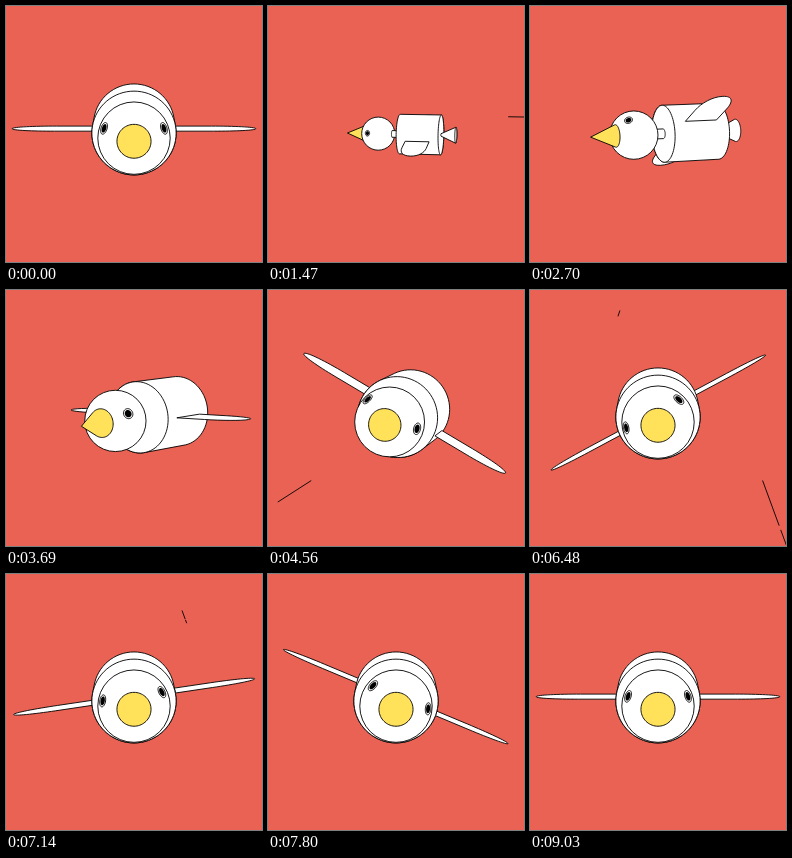
An HTML page with a canvas that plays this animation: 256x256 px, repeating every 9.06 s.

```html
<!DOCTYPE html>
<html lang="en">
<head>
<meta charset="utf-8">
<title>Flying bird</title>
<style>
  html, body { margin: 0; width: 100%; height: 100%; overflow: hidden; background: #e96254; }
  canvas { display: block; width: 256px; height: 256px; }
</style>
</head>
<body>
<canvas id="stage"></canvas>
<script>
const SIZE = 256, LOOP = 9060, STEP = 30;
const RED = '#e96254', YELLOW = '#ffe25a', INK = '#000';
const canvas = document.getElementById('stage');
const ctx = canvas.getContext('2d');
const dpr = window.devicePixelRatio || 1;
canvas.width = canvas.height = SIZE * dpr;

const RAD = Math.PI / 180;
const UNIT = 42.3;        // body radius in pixels at zoom 1
const DIST = 50;          // camera distance in body radii
const PIVOT = 1.25;       // point on the bird's axis the camera circles
const PITCH = 6 * RAD;
const HEAD = { z: 2.17, r: 0.84 };
const WIND = 90;          // body radii per second
const END = LOOP - STEP;

const yawKeys = [[0, 0], [1250, 102.5], [1470, 101], [2700, 66], [4560, 9.6], [5200, 0], [END, 0]];
const zoomKeys = [[0, 1], [1000, 0.55], [1470, 0.467], [2700, 0.675], [4560, 0.965], [5200, 1], [END, 1]];
const rollKeys = [[0, 0], [1470, -14.5], [2750, 30], [4650, -30.2], [6500, 28.3], [8100, -28], [END, 0]];

// time, x, y, z of the leading end at that time, length
const streaks = [
  [700, -1, 0.3, 0, 5],
  [1470, 0, 0.97, -4.4, 4],
  [2200, -1, -0.6, 0, 5],
  [3150, -1, 0.8, 0, 5],
  [4560, -1.83, -1.4, 6.25, 3.6],
  [5150, 1.9, -1.5, 1, 6],
  [6480, 2.48, -1.49, 8.15, 6.9],
  [6480, 2.48, -1.49, 11, 2.3],
  [6480, -1.32, 1.27, -18.75, 3.6],
  [8150, -1.6, 1, 1, 5]
];

// Monotone cubic through the keys, flat at every extreme
function sample(keys, t) {
  let i = 0;
  while (i < keys.length - 2 && t > keys[i + 1][0]) i++;
  const slope = k => (keys[k + 1][1] - keys[k][1]) / (keys[k + 1][0] - keys[k][0]);
  const tangent = k => {
    if (k === 0 || k === keys.length - 1) return 0;
    const a = slope(k - 1), b = slope(k);
    return a * b <= 0 ? 0 : 2 * a * b / (a + b);
  };
  const [t0, v0] = keys[i], [t1, v1] = keys[i + 1];
  const h = t1 - t0, u = (t - t0) / h, w = 1 - u;
  return w * w * (1 + 2 * u) * v0 + u * u * (3 - 2 * u) * v1
    + h * u * w * (w * tangent(i) - u * tangent(i + 1));
}

let yaw = 0, roll = 0, zoom = 1;

// Yaw and pitch only
function turn([x, y, z]) {
  const X = x * Math.cos(yaw) - z * Math.sin(yaw);
  const Z = x * Math.sin(yaw) + z * Math.cos(yaw);
  return [X, y * Math.cos(PITCH) - Z * Math.sin(PITCH), Z * Math.cos(PITCH) + y * Math.sin(PITCH)];
}

function bank([x, y, z]) {
  const c = Math.cos(roll), s = Math.sin(roll);
  return [x * c - y * s, x * s + y * c, z];
}

function project([x, y, z]) {
  const [X, Y, Z] = turn([x, y, z - PIVOT]);
  const k = UNIT * zoom * DIST / (DIST - Z);
  return { x: SIZE / 2 + X * k, y: SIZE / 2 - Y * k, k, depth: Z };
}

const place = p => project(bank(p));

function paint(fill) {
  ctx.fillStyle = fill;
  ctx.fill();
  ctx.stroke();
}

function trace(points) {
  ctx.beginPath();
  points.forEach(p => ctx.lineTo(p.x, p.y));
  ctx.closePath();
}

function hull(points) {
  const pts = points.slice().sort((a, b) => a.x - b.x || a.y - b.y);
  const half = list => {
    const out = [];
    for (const p of list) {
      while (out.length > 1) {
        const a = out[out.length - 2], b = out[out.length - 1];
        if ((b.x - a.x) * (p.y - a.y) - (b.y - a.y) * (p.x - a.x) > 0) break;
        out.pop();
      }
      out.push(p);
    }
    out.pop();
    return out;
  };
  return half(pts).concat(half(pts.reverse()));
}

function ring(z, r) {
  return Array.from({ length: 72 }, (_, i) => {
    const a = i * 5 * RAD;
    return project([r * Math.cos(a), r * Math.sin(a), z]);
  });
}

// Cylinder or cone along the bird's axis, with the end cap that faces us
function solid(back, rBack, front, rFront, fill, facing) {
  const a = ring(back, rBack), b = ring(front, rFront);
  trace(hull(a.concat(b)));
  paint(fill);
  if (facing ? rFront : rBack) {
    trace(facing ? b : a);
    paint(fill);
  }
}

// Flat wing with straight edges and a domed tip
function wing(side) {
  const p = (u, z) => place([side * u, 0, z]);
  const line = a => ctx.lineTo(a.x, a.y);
  const curve = (a, b, c) => ctx.bezierCurveTo(a.x, a.y, b.x, b.y, c.x, c.y);
  ctx.beginPath();
  line(p(1, 0.6));
  line(p(1.9, 0.6));
  curve(p(2.45, 0.6), p(2.95, 0.4), p(2.95, 0));
  curve(p(2.95, -0.4), p(2.45, -0.6), p(1.9, -0.6));
  line(p(1, -0.6));
  ctx.closePath();
  paint('#fff');
}

function eye(side) {
  const n = [side * 0.82, 0.32, 0.47];
  if (turn(bank(n))[2] < 0.05) return;
  const flat = Math.hypot(n[0], n[2]);
  const across = [n[2] / flat, 0, -n[0] / flat];
  const up = [-n[0] * n[1] / flat, flat, -n[2] * n[1] / flat];
  const disc = r => trace(Array.from({ length: 36 }, (_, i) => {
    const c = r * Math.cos(i * 10 * RAD), s = r * Math.sin(i * 10 * RAD);
    const q = n.map((v, k) => v * HEAD.r + across[k] * c + up[k] * s);
    return place([q[0], q[1], q[2] + HEAD.z]);
  }));
  disc(0.14);
  paint('#fff');
  disc(0.102);
  ctx.fillStyle = INK;
  ctx.fill();
}

function head() {
  const c = project([0, 0, HEAD.z]);
  ctx.beginPath();
  ctx.arc(c.x, c.y, HEAD.r * c.k, 0, Math.PI * 2);
  paint('#fff');
  eye(-1);
  eye(1);
}

function wind(t) {
  for (const [at, x, y, z, len] of streaks) {
    if (Math.abs(t - at) > 1400) continue;
    const lead = z - WIND * (t - at) / 1000;
    const a = project([x, y, lead]), b = project([x, y, lead - len]);
    if (Math.max(a.depth, b.depth) > 44) continue;
    ctx.beginPath();
    ctx.moveTo(a.x, a.y);
    ctx.lineTo(b.x, b.y);
    ctx.stroke();
  }
}

function bird() {
  const facing = Math.cos(yaw) > 0;
  const near = side => turn(bank([side, 0, 0]))[2] > 0 && Math.sin(yaw) * side > 0.02;
  const parts = [
    () => solid(-1.8, 0.4, -1.05, 0.06, '#fff', facing),
    () => {
      [-1, 1].filter(s => !near(s)).forEach(wing);
      solid(-1.05, 1, 1.05, 1, '#fff', facing);
      [-1, 1].filter(near).forEach(wing);
    },
    () => solid(1.05, 0.17, 1.45, 0.17, '#fff', facing),
    head,
    () => solid(2.85, 0.39, 3.78, 0, YELLOW, facing)
  ];
  if (!facing) parts.reverse();
  parts.forEach(draw => draw());
}

function frame(now) {
  const t = Math.floor(now % LOOP / STEP) * STEP;
  yaw = sample(yawKeys, t) * RAD;
  roll = sample(rollKeys, t) * RAD;
  zoom = sample(zoomKeys, t);
  ctx.setTransform(dpr, 0, 0, dpr, 0, 0);
  ctx.fillStyle = RED;
  ctx.fillRect(0, 0, SIZE, SIZE);
  ctx.strokeStyle = INK;
  ctx.lineWidth = 0.9;
  ctx.lineJoin = 'round';
  wind(t);
  bird();
}

const start = performance.now();
function loop() {
  frame(performance.now() - start);
  requestAnimationFrame(loop);
}
loop();
</script>
</body>
</html>
```
